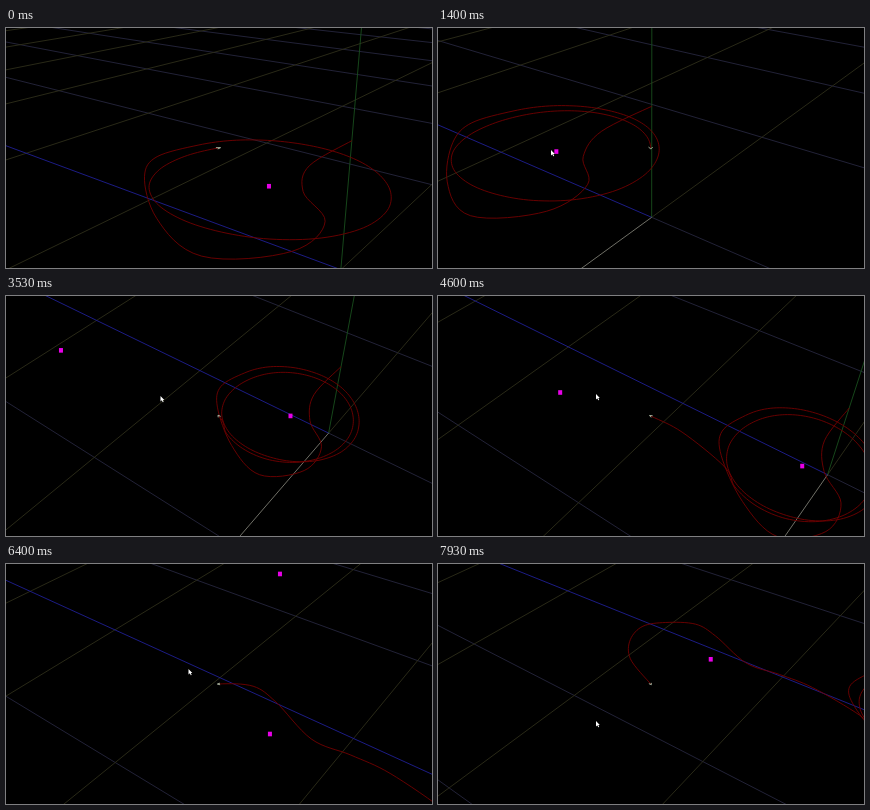
An HTML page that plays this animation: 426 by 240 pixels, repeating every 8000 ms.

```html
<!DOCTYPE html>
<html lang="en">
<head>
<meta charset="utf-8">
<title>Flight trail</title>
<style>
  html, body { margin: 0; width: 100%; height: 100%; overflow: hidden; background: #000; }
  svg { display: block; width: 100%; height: 100%; }
  path { fill: none; stroke-width: 0.9; }
</style>
</head>
<body>
<svg viewBox="0 0 426 240">
  <rect width="426" height="240" fill="#000"/>
  <path id="rows" stroke="#26263e"/>
  <path id="columns" stroke="#2e2e1a"/>
  <path id="up" stroke="#194e1d"/>
  <path id="blue" stroke="#202094"/>
  <path id="white" stroke="#7c7c72"/>
  <path id="trail" stroke="#720000"/>
  <g id="marks" fill="#e800e8"></g>
  <path id="craft" stroke="#b4c2ac"/>
  <path id="cursor" d="M0 0V5.4L1.3 4.3L2.3 6.3L3.2 5.9L2.3 4H3.8Z" style="fill:#fff;stroke:none"/>
</svg>
<script>
const LOOP = 8000, FPS = 15;
const FOCAL = 580, CX = 212.7, CY = 120, HEIGHT = 0.52, REACH = 9, NEAR = 0.15;
const $ = id => document.getElementById(id);
const lerp = (a, b, k) => a + (b - a) * k;
const clamp = k => Math.max(0, Math.min(1, k));
const smooth = k => k * k * (3 - 2 * k);
const rad = deg => deg * Math.PI / 180;

// Uniform Catmull-Rom through numbers, at fractional index i.
function spline(list, i) {
  const n = Math.min(Math.floor(i), list.length - 2), u = i - n;
  const [p, q, r, s] = [-1, 0, 1, 2].map(d => list[Math.max(0, Math.min(list.length - 1, n + d))]);
  return q + 0.5 * u * (r - p + u * (2 * p - 5 * q + 4 * r - s + u * (3 * q - p - 3 * r + s)));
}

// Flight path in grid cells: an S-shaped start, nearly two laps, then the way out.
const LAP = { b: 0.04, w: 0.465, from: 16, step: 20, count: 34 };
const LAP_RADII = [.367, .337, .338, .359, .342, .347, .309, .297, .309, .335, .36, .362];
const lap = Array.from({ length: LAP.count }, (_, i) => {
  const r = spline(LAP_RADII, i * LAP.step / 60), a = rad(LAP.from + i * LAP.step);
  return [LAP.b + r * Math.cos(a), LAP.w - r * Math.sin(a)];
});
const way = [
  [0, 0], [.002, .29], [-.08, .471], [-.214, .592], [-.225, .769],
  [-.076, .912], [.131, .841], [.346, .668], [.428, .528],
  ...lap,
  [.58, .651], [.77, .652], [.967, .667], [1.244, .538], [1.41, .5],
  [1.565, .593], [1.65, .71], [1.62, .87], [1.5, 1.02], [1.273, 1.134]
];

// Key poses: way index reached, camera yaw, pitch and distance, cursor tip.
const POSES = [
  { t: 0,    way: 27.38, yaw: 52,   pitch: 20.5, dist: 1.95, x: 113, y: 122 },
  { t: 1400, way: 33.47, yaw: 52.3, pitch: 27,   dist: 1.95, x: 113, y: 122 },
  { t: 2600, way: 38.28, yaw: 53.1, pitch: 43.8, dist: 1.95, x: 130.5, y: 104 },
  { t: 3530, way: 42,    yaw: 53.1, pitch: 43.8, dist: 2.9,  x: 154.5, y: 100 },
  { t: 4600, way: 44,    yaw: 53.1, pitch: 43.8, dist: 2.9,  x: 158, y: 98 },
  { t: 6400, way: 48,    yaw: 53.1, pitch: 38,   dist: 3.05, x: 182.5, y: 105 },
  { t: 7930, way: 52,    yaw: 53.1, pitch: 38,   dist: 3.05, x: 158, y: 157 }
];
const CURSOR_FROM = 700;

// Markers appear at `show` and drift between two spots.
const MARKS = [
  { show: 0,    from: [.015, .5],    to: [.015, .5] },
  { show: 2600, from: [1.34, .823],  to: [1.14, .755] },
  { show: 4600, from: [1.97, -.655], to: [1.97, -.655] }
];
const DRIFT_START = 3530, DRIFT_TIME = 2500;

// Sampled path with running length, for even speed between poses.
const SUB = 8, bs = way.map(p => p[0]), ws = way.map(p => p[1]);
const curve = Array.from({ length: (way.length - 1) * SUB + 1 },
  (_, i) => [spline(bs, i / SUB), spline(ws, i / SUB)]);
const run = [0];
for (let i = 1; i < curve.length; i++)
  run[i] = run[i - 1] + Math.hypot(curve[i][0] - curve[i - 1][0], curve[i][1] - curve[i - 1][1]);

function lengthAt(index) {
  const s = index * SUB, i = Math.min(Math.floor(s), run.length - 2);
  return lerp(run[i], run[i + 1], s - i);
}

function flown(len) {
  let i = 1;
  while (i < curve.length - 1 && run[i] < len) i++;
  const k = clamp((len - run[i - 1]) / (run[i] - run[i - 1]));
  const head = [0, 1].map(a => lerp(curve[i - 1][a], curve[i][a], k));
  return { head, points: [...curve.slice(0, i), head] };
}

// Camera looking at the craft; axis b points up-left, axis w down-left.
function camera([tb, tw], yaw, pitch, range) {
  const s = Math.sin(rad(pitch)), c = Math.cos(rad(pitch));
  const ys = Math.sin(rad(yaw)), yc = Math.cos(rad(yaw));
  return ([b, w, y]) => {
    b -= tb; w -= tw; y -= HEIGHT;
    const side = -ys * b - yc * w, ahead = yc * b - ys * w;
    return [side, -ahead * s - y * c, range + ahead * c - y * s];
  };
}
const project = ([x, y, z]) => [CX + FOCAL * x / z, CY + FOCAL * y / z];
const fmt = p => p.map(v => v.toFixed(2)).join(' ');

function segment(view, from, to) {
  let a = view(from), b = view(to);
  if (a[2] < NEAR && b[2] < NEAR) return '';
  const cut = (p, q) => p.map((v, i) => lerp(v, q[i], (NEAR - p[2]) / (q[2] - p[2])));
  if (a[2] < NEAR) a = cut(a, b);
  else if (b[2] < NEAR) b = cut(b, a);
  return `M${fmt(project(a))}L${fmt(project(b))}`;
}
const strip = (view, points) =>
  'M' + points.map(([b, w]) => fmt(project(view([b, w, HEIGHT])))).join('L');

const boxes = MARKS.map(() => {
  const box = document.createElementNS('http://www.w3.org/2000/svg', 'rect');
  box.setAttribute('width', 4);
  box.setAttribute('height', 4.6);
  return $('marks').appendChild(box);
});

function draw(t) {
  const n = POSES.findLastIndex((p, i) => p.t <= t && i < POSES.length - 1);
  const a = POSES[n], b = POSES[n + 1];
  const k = clamp((t - a.t) / (b.t - a.t));
  const mix = key => lerp(a[key], b[key], smooth(k));
  const set = (id, d) => $(id).setAttribute('d', d);

  const len = lerp(lengthAt(a.way), lengthAt(b.way), k);
  const { head, points } = flown(len);
  const view = camera(head, mix('yaw'), mix('pitch'), mix('dist'));

  let rows = '', columns = '';
  for (let i = -REACH; i <= REACH; i++) {
    const end = i ? REACH : 0;
    rows += segment(view, [-REACH, i, 0], [end, i, 0]);
    columns += segment(view, [i, -REACH, 0], [i, end, 0]);
  }
  set('rows', rows);
  set('columns', columns);
  set('up', segment(view, [0, 0, 0], [0, 0, REACH]));
  set('blue', segment(view, [0, 0, 0], [REACH, 0, 0]));
  set('white', segment(view, [0, 0, 0], [0, REACH, 0]));
  set('trail', strip(view, points));

  const back = flown(len - 0.02).head;
  const db = (head[0] - back[0]) * 0.35, dw = (head[1] - back[1]) * 0.35;
  set('craft', strip(view, [
    [head[0] - db - dw, head[1] - dw + db], [head[0] + db, head[1] + dw],
    [head[0] - db + dw, head[1] - dw - db]
  ]));

  const drift = clamp((t - DRIFT_START) / DRIFT_TIME);
  MARKS.forEach(({ show, from, to }, i) => {
    const spot = [0, 1].map(j => lerp(from[j], to[j], drift));
    const [x, y] = project(view([...spot, HEIGHT]));
    boxes[i].setAttribute('x', (x - 2).toFixed(2));
    boxes[i].setAttribute('y', (y - 2.3).toFixed(2));
    boxes[i].style.display = t < show ? 'none' : '';
  });

  $('cursor').setAttribute('transform', `translate(${mix('x')} ${mix('y')})`);
  $('cursor').style.display = t < CURSOR_FROM ? 'none' : '';
}

const start = performance.now();
function tick() {
  const t = (performance.now() - start) % LOOP;
  draw(Math.floor((t + 4) * FPS / 1000) * 1000 / FPS % LOOP);
  requestAnimationFrame(tick);
}
tick();
</script>
</body>
</html>
```
